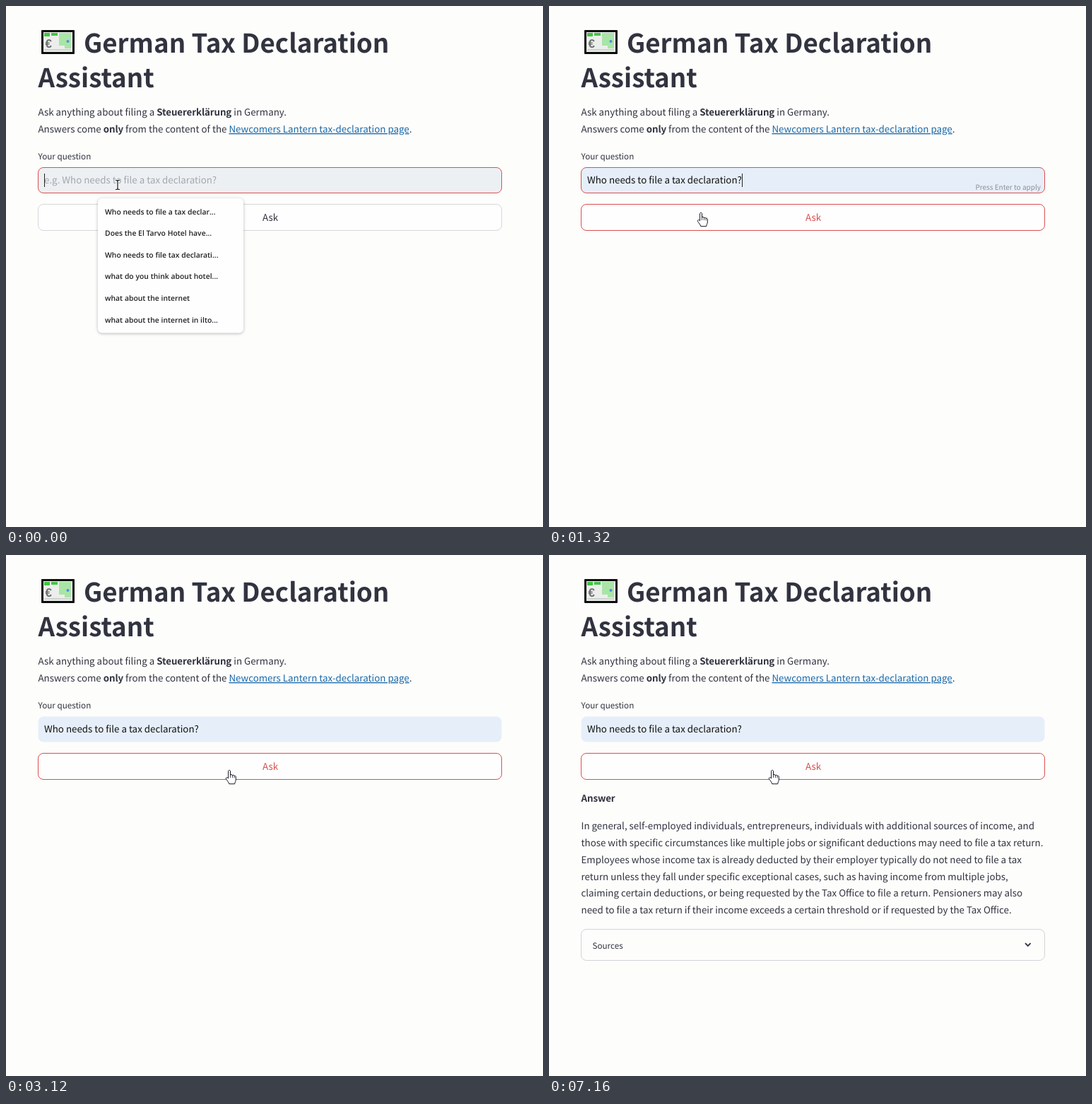
Animation of 760 by 737 pixels, one loop 8000 ms. Source, as an HTML page:

```html
<!DOCTYPE html>
<html lang="en">
<head>
<meta charset="utf-8">
<title>Tax assistant</title>
<style>
  html, body { margin: 0; width: 100%; height: 100%; overflow: hidden; background: #fdfdfc; }
  svg { display: block; width: 100%; height: 100%; }
  text { font: 13.35px "Noto Sans CJK SC", "Noto Sans CJK JP", "Noto Sans CJK", sans-serif; fill: #31333f; text-rendering: geometricPrecision; white-space: pre; }
  .title { font-size: 36.7px; font-weight: 700; }
  .bold { font-weight: 600; letter-spacing: -.1px; }
  .small { font-size: 11.68px; }
  .link { fill: #1a69a8; text-decoration: underline; }
  .hint { font-size: 10px; fill: #8b8f98; }
  .preview { font: 12.42px "Liberation Sans", Arial, sans-serif; fill: #111; }
  #rows text { font: 600 10.4px "Open Sans", "Noto Sans", sans-serif; fill: #202124; }
  #pop { filter: drop-shadow(0 1px 2px #0004); }
</style>
</head>
<body>
<svg viewBox="0 0 760 737">
  <g id="note">
    <rect x="50" y="34" width="47" height="34" rx="1" fill="#0b0d0c"/>
    <rect x="53" y="37" width="41" height="28" fill="#eceeec"/>
    <path d="M54 38h8v5h-8zM64 38h9v4h-9z" fill="#43c443"/>
    <path d="M75 38h17v22h-9v-4h-8z" fill="#a9e5a6"/>
    <path d="M54 62h38" stroke="#cfd3cf" stroke-width="2"/>
    <circle cx="87.5" cy="50" r="2" fill="#4c8fe0"/>
    <text x="55.5" y="59" style="font:700 17px 'Liberation Sans',sans-serif;fill:#6d716f">€</text>
  </g>
  <text class="title" x="110" y="66">German Tax Declaration</text>
  <text class="title" x="45.5" y="115">Assistant</text>
  <text x="45.5" y="155">Ask anything about filing a <tspan class="bold">Steuererklärung</tspan> in Germany.</text>
  <text x="45.5" y="179">Answers come <tspan class="bold">only</tspan> from the content of the <tspan class="link">Newcomers Lantern tax-declaration page</tspan>.</text>
  <text class="small" x="45.5" y="216.5">Your question</text>

  <rect id="field" x="45.5" y="228.5" width="656" height="36" rx="7.5"/>
  <text id="value" x="54" y="251"></text>
  <path id="caret" d="M54.5 237v19" stroke="#222" stroke-width="1"/>
  <text id="hint" class="hint" x="696" y="260" text-anchor="end">Press Enter to apply</text>

  <rect id="button" x="45.5" y="280.5" width="656" height="37" rx="7.5" fill="#fefefe"/>
  <text id="ask" x="374" y="304" text-anchor="middle">Ask</text>

  <g id="list">
    <rect id="pop" x="130" y="272" width="206" height="190.5" rx="6" fill="#fefefe"/>
    <g id="hover">
      <rect x="133" y="275.3" width="199" height="30.5" rx="4" fill="#efeff1"/>
      <path d="M313.5 286.8l7.4 7.4m0-7.4l-7.4 7.4" stroke="#333" stroke-width="1.4"/>
    </g>
    <g id="rows"></g>
  </g>

  <g id="answer">
    <text class="bold" x="45.5" y="349">Answer</text>
    <g id="lines"></g>
    <rect x="45.5" y="529.5" width="656" height="44" rx="7.5" fill="none" stroke="#d3d4d9"/>
    <text class="small" x="61.5" y="556.5">Sources</text>
    <path d="M674 549.2l3.8 3.8 3.8-3.8" fill="none" stroke="#31333f" stroke-width="1.8"/>
  </g>

  <g id="beam" fill="none" stroke="#fff" stroke-width="3">
    <path d="M-3-6.5h2l1 1 1-1h2M0-5.5v11M-3 6.5h2l1-1 1 1h2"/>
    <path d="M-3-6.5h2l1 1 1-1h2M0-5.5v11M-3 6.5h2l1-1 1 1h2" stroke="#111" stroke-width="1.2"/>
  </g>
  <path id="arrow" d="M0 0v14l3.2-3 2.2 5 2.4-1-2.2-4.9h4.6z" fill="#fff" stroke="#111" stroke-width="1.1"/>
  <g id="hand" fill="#fff" stroke="#14151f" stroke-linejoin="round">
    <path d="M-1.4 11.5V1.4C-1.4-.6 1.5-.6 1.5 1.4V7C1.8 5.6 4.3 5.8 4.4 7.4 5 6.3 7 6.7 7.1 8.2 7.8 7.3 9.3 7.8 9.3 9.4V13.5C9.3 15.3 8 16.5 7.7 19.3H-.2C-.5 17-3.3 14.5-4.6 12.2-5.3 10.6-3.4 9.7-2.4 10.6z"/>
    <path d="M1.5 7v3.5M4.4 7.4v3.3M7.1 8.2v2.8" fill="none" stroke-width=".8"/>
  </g>
</svg>
<script>
const LOOP = 8000, RED = "#da504f";
const CLOSE = 1280, BLUR = 3040, REPLY = 7160;
const question = "Who needs to file a tax declaration?";
const el = id => document.getElementById(id);
const show = (id, on) => el(id).style.display = on ? "" : "none";

function addText(parent, x, y, words) {
  const node = document.createElementNS("http://www.w3.org/2000/svg", "text");
  node.setAttribute("x", x);
  node.setAttribute("y", y);
  node.textContent = words;
  el(parent).append(node);
}

["Who needs to file a tax declar...", "Does the El Tarvo Hotel have...",
 "Who needs to file tax declarati...", "what do you think about hotel...",
 "what about the internet", "what about the internet in ilto..."
].forEach((row, i) => addText("rows", 140, 294.8 + i * 30.55, row));

["In general, self-employed individuals, entrepreneurs, individuals with additional sources of income, and",
 "those with specific circumstances like multiple jobs or significant deductions may need to file a tax return.",
 "Employees whose income tax is already deducted by their employer typically do not need to file a tax",
 "return unless they fall under specific exceptional cases, such as having income from multiple jobs,",
 "claiming certain deductions, or being requested by the Tax Office to file a return. Pensioners may also",
 "need to file a tax return if their income exceeds a certain threshold or if requested by the Tax Office."
].forEach((line, i) => addText("lines", 45.5, Math.round(388 + i * 23.86), line));

const previews = [question, "Does the El Tarvo Hotel have wifi?", "Who needs to file tax declaration?"];

// time, x, y of the pointer's hot spot
const path = [
  [0, 158, 253], [80, 158, 253], [200, 196, 366], [440, 196, 366],
  [560, 215, 287], [640, 215, 287], [1160, 215, 292], [1600, 215, 293],
  [1800, 277, 305], [1960, 277, 305], [2040, 342, 305], [2200, 329, 305],
  [2280, 316, 304.5], [LOOP, 316, 304.5]
];

function pointer(t) {
  const i = path.findIndex(p => p[0] > t);
  const [a, b] = [path[i - 1], path[i]];
  const k = (t - a[0]) / (b[0] - a[0]);
  return [a[1] + (b[1] - a[1]) * k, a[2] + (b[2] - a[2]) * k];
}

function draw(t) {
  const [x, y] = pointer(t);
  const open = t < CLOSE, focus = t < BLUR;
  const row = open && y > 275 ? Math.min(2, Math.floor((y - 275) / 30.55)) : -1;
  const empty = open && row < 0;

  const kind = !open ? "hand" : y < 265 ? "beam" : "arrow";
  for (const id of ["beam", "arrow", "hand"]) show(id, id === kind);
  el(kind).setAttribute("transform", `translate(${x.toFixed(1)} ${y.toFixed(1)})`);

  show("list", open);
  show("hover", row >= 0);
  el("hover").setAttribute("transform", `translate(0 ${Math.max(row, 0) * 30.55})`);

  const value = el("value");
  value.textContent = empty ? "e.g. " + question : open ? previews[row] : question;
  value.setAttribute("class", row >= 0 ? "preview" : "");
  value.style.fill = empty ? "#a4a6ae" : "#111";

  el("field").setAttribute("fill", empty ? "#edf0f3" : "#e6eff9");
  el("field").setAttribute("stroke", focus ? RED : "none");
  show("hint", !open && focus);
  const blink = !open && focus && (t - CLOSE) % 1000 < 500;
  show("caret", empty || blink);
  el("caret").setAttribute("transform", `translate(${empty ? 0 : 219} 0)`);

  el("button").setAttribute("stroke", open ? "#d6d7db" : RED);
  el("ask").style.fill = open ? "#31333f" : RED;
  show("answer", t >= REPLY);
}

const start = performance.now();
function tick() {
  draw((performance.now() - start) % LOOP);
  requestAnimationFrame(tick);
}
draw(0);
requestAnimationFrame(tick);
</script>
</body>
</html>
```
